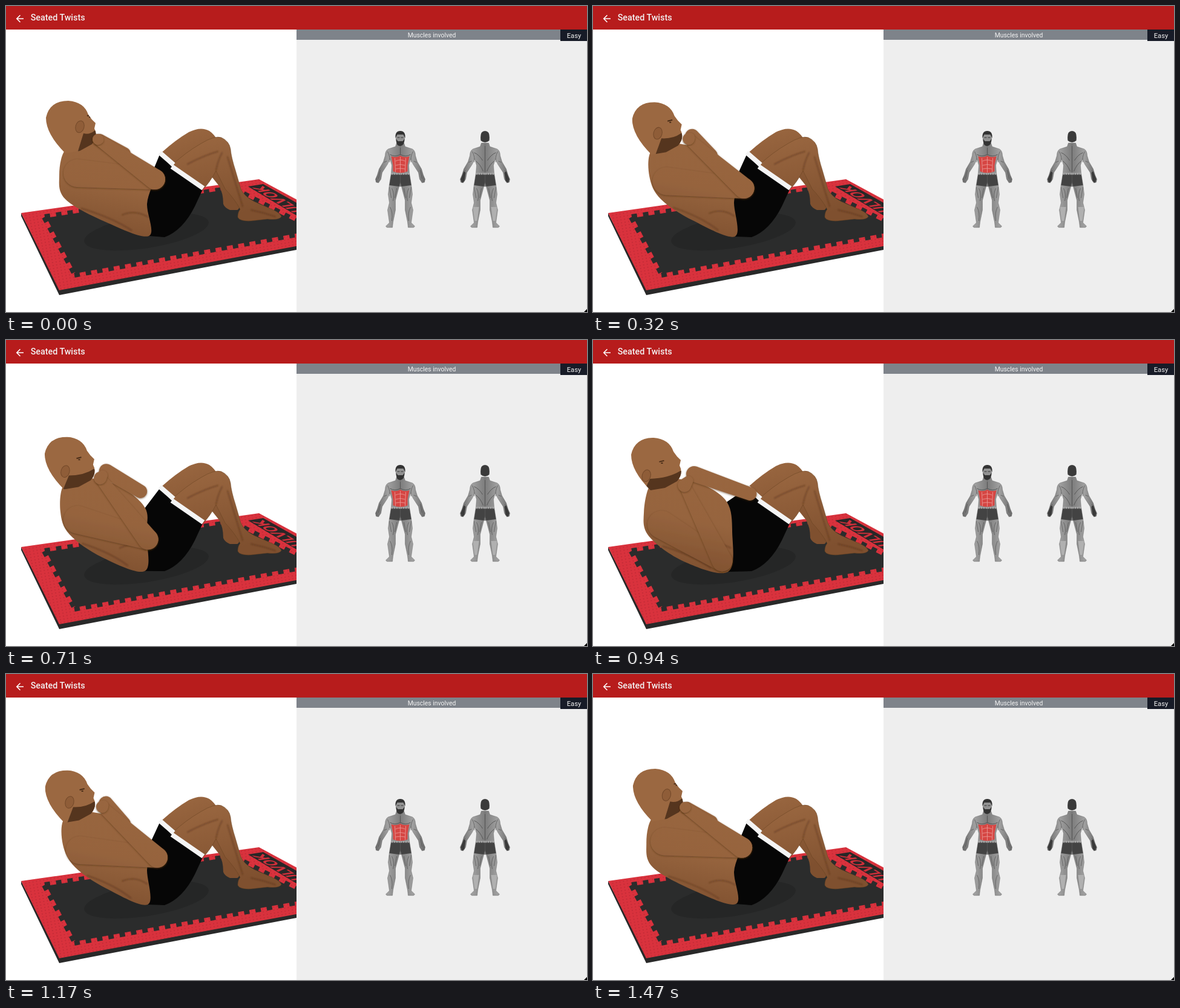
An HTML page that plays this animation: 960 px wide and 507 px high, repeating every 1.56 s.

```html
<!DOCTYPE html>
<html lang="en">
<head>
<meta charset="utf-8">
<title>Seated Twists</title>
<style>
  html, body { margin: 0; width: 100%; height: 100%; overflow: hidden; background: #fff; }
  svg { display: block; }
  text { font-family: Roboto, sans-serif; fill: #f3f3f3; }
  .crease { fill: none; stroke: #4d2b14; stroke-opacity: .4; stroke-width: 2; stroke-linecap: round; filter: url(#soft); }
  .limb { filter: url(#shade); }
</style>
</head>
<body>
<svg width="960" height="507" viewBox="0 0 960 507">
  <defs>
    <linearGradient id="skin" gradientUnits="userSpaceOnUse" x1="150" y1="190" x2="110" y2="390">
      <stop stop-color="#99663f"/><stop offset=".5" stop-color="#96643e"/><stop offset="1" stop-color="#7b4d2d"/>
    </linearGradient>
    <linearGradient id="legSkin" x1="0" y1="0" x2=".3" y2="1">
      <stop stop-color="#9b6841"/><stop offset="1" stop-color="#7f502f"/>
    </linearGradient>
    <linearGradient id="hair" x1="1" y1="0" x2="0" y2="1">
      <stop stop-color="#4b2f1a"/><stop offset=".5" stop-color="#5c3a21"/><stop offset="1" stop-color="#7d512f"/>
    </linearGradient>
    <linearGradient id="grey">
      <stop stop-color="#686868"/><stop offset=".5" stop-color="#a0a0a0"/><stop offset="1" stop-color="#7c7c7c"/>
    </linearGradient>
    <pattern id="foam" width="6" height="5" patternUnits="userSpaceOnUse" patternTransform="rotate(-10)">
      <path fill="#d9323d" d="M0 0h6v5H0z"/><circle cx="2" cy="2" r="1" fill="#c02a35"/>
    </pattern>
    <filter id="soft" x="-30%" y="-30%" width="160%" height="160%"><feGaussianBlur stdDeviation="1"/></filter>
    <filter id="shade"><feDropShadow dx="0" dy="1" stdDeviation="1.5" flood-color="#4d2b14" flood-opacity=".6"/></filter>
    <clipPath id="skull"><path d="M98 244Q66 212 66 185 72 157 103 157 129 159 136 180 141 188 148 194L146 203Q153 216 142 229L122 240Z"/></clipPath>
    <g id="half">
      <path fill="url(#grey)" stroke="#555" stroke-opacity=".5" stroke-width=".8" d="M0 227H-6L-8 233-20 237Q-25 240-25 248L-28 258-35 270-38 280-41 287-40 292-36 293-32 287-30 276-21 262-17 253-14 264-15 277-18 295-20 312-18 326-21 338-18 359-24 365-22 367-13 367-12 358-8 338-8 322-2 299H0Z"/>
      <path fill="none" stroke="#484848" stroke-opacity=".6" d="M-21 241Q-16 251-18 259M-14 302Q-9 312-12 323M-17 333Q-12 342-14 356M-27 259-22 257M-33 272-36 286M-6 302-9 318M-18 300-15 318"/>
      <path fill="#434343" d="M0 278H-15L-18 297-2 299 0 292Z"/>
      <path stroke="#aaa" stroke-width="3" stroke-dasharray="3 1" d="M-15 278H0"/>
    </g>
    <g id="man"><use href="#half"/><use href="#half" transform="scale(-1 1)"/></g>
  </defs>

  <!-- mat -->
  <path fill="#292929" d="M25 343V348L88 479 480 404V396L90 470Z"/>
  <path fill="url(#foam)" d="M25 343 418 287 490 326V396L88 471Z"/>
  <path fill="#2b2c2c" d="M67 351 372 303 480 358V377L115 443Z"/>
  <path fill="none" stroke="#2b2c2c" stroke-width="8" stroke-dasharray="9 10" d="M63 350 113 444M113 446 480 379M64 349 370 302M376 302 482 357"/>
  <path fill="#272727" d="M400 299 425 295 480 326V347Z"/>
  <text transform="matrix(-.86 -.53 .97 -.14 424 298)" text-anchor="end" font-size="26" font-weight="700" style="fill:#cf2f3a">DULVOK</text>
  <ellipse cx="232" cy="374" rx="104" ry="27" transform="rotate(-9 232 374)" fill="#252626"/>

  <!-- legs and shorts -->
  <path fill="url(#legSkin)" d="M258 242Q280 222 302 209 322 199 336 207 345 213 350 224L372 270 386 322Q388 335 382 338L370 338Q361 334 359 328 359 310 352 298L340 283 280 266Z"/>
  <path fill="url(#legSkin)" stroke="#65401f" stroke-opacity=".5" d="M274 264Q296 243 322 228 345 214 356 218 369 224 371 237 372 250 379 272L388 303Q393 315 410 324L442 338Q454 344 455 349 451 355 432 353L405 356Q386 357 383 350 383 341 387 337 378 320 362 303L347 273Q336 294 325 304Z"/>
  <path class="crease" d="M347 272Q350 256 357 243M300 262Q326 248 350 241M366 250Q378 290 391 332M405 338Q425 342 445 349"/>
  <path id="shorts" fill="#060606"/>
  <path stroke="#f4f4f4" stroke-width="8" d="M254 243 277 263M274 266 326 302"/>

  <!-- upper body -->
  <path id="torso" fill="url(#skin)"/>
  <path id="back" class="crease"/>
  <path id="side" class="crease"/>
  <path id="farArm" class="limb" fill="url(#skin)"/>
  <g id="head"><g clip-path="url(#skull)">
    <path fill="#9b6841" d="M60 150H160V250H60Z"/>
    <path id="hair" fill="url(#hair)"/>
    <path id="beard" fill="#55351e"/>
    <ellipse id="ear" rx="7" ry="10" fill="#8f5d38" stroke="#5c371d" stroke-opacity=".6"/>
    <path id="eye" fill="none" stroke="#4a2d18" stroke-width="2"/>
  </g></g>
  <path id="upperArm" class="limb" fill="url(#skin)"/>
  <path id="forearm" class="limb" fill="url(#skin)"/>
  <path id="palm" class="limb" fill="url(#skin)"/>

  <!-- app bar -->
  <path fill="#b71c1c" d="M0 0H960V39H0Z"/>
  <path fill="none" stroke="#fff" stroke-width="1.6" d="M29 21H18M23.5 15.3 17.8 21 23.5 26.7"/>
  <text x="40.700" y="23.800" font-size="14.3" font-weight="500">Seated Twists</text>

  <!-- muscle panel -->
  <path fill="#eee" d="M480 39H960V507H480Z"/>
  <path fill="#7e838a" d="M480 39H916V56H480Z"/>
  <path fill="#171b27" d="M916 39H960V58H916Z"/>
  <text x="703.500" y="51.500" font-size="10.4" text-anchor="middle">Muscles involved</text>
  <text x="938.500" y="53" font-size="11.2" text-anchor="middle">Easy</text>
  <path d="M960 502V507H955Z"/>
  <g transform="translate(651.5)">
    <use href="#man"/>
    <ellipse cy="219" rx="7.500" ry="11.500" fill="#929292"/>
    <path fill="#333" d="M-8 219Q-9 207 0 207T8 219L5 213H-5ZM-7 220-4 224H4L7 220Q7 231 0 232T-7 220Z"/>
    <path stroke="#333" d="M-5 218H-1M1 218H5"/>
    <path fill="none" stroke="#555" d="M-17 246Q-9 251 0 246 9 251 17 246M0 235V246"/>
    <path fill="#d64643" d="M-15 249Q-7 252 0 248 7 252 15 249L12 264 12 274Q0 279-12 274L-12 264Z"/>
    <path fill="none" stroke="#eda19d" stroke-width=".8" d="M0 250V276M-8 257Q0 253 8 257M-8 264Q0 261 8 264M-8 270Q0 268 8 270M-9 252-8 275M9 252 8 275"/>
  </g>
  <g transform="translate(791.5)">
    <use href="#man"/>
    <path fill="#3a3a3a" d="M-7 223Q-9 207 0 207T7 223Q0 229-7 223ZM-35 274-32 276-34 290-38 293-40 287ZM35 274 32 276 34 290 38 293 40 287Z"/>
    <path fill="none" stroke="#4c4c4c" stroke-opacity=".8" d="M0 232V275M-18 243Q-10 246-4 256M18 243Q10 246 4 256M-15 257Q-8 262-3 274M15 257Q8 262 3 274"/>
    <path fill="#b0b0b0" d="M-20 333H-10L-13 356H-17ZM20 333H10L13 356H17Z"/>
  </g>
</svg>
<script>
// Key points when turned away, in profile and turned towards the viewer.
const joints = {
  nape: [[98, 238], [96, 240], [96, 238]],
  blade: [[88, 280], [94, 283], [84, 285]],
  ribs: [[98, 320], [114, 320], [92, 325]],
  loin: [[165, 358], [165, 355], [150, 367]],
  seat: [[236, 381], [234, 382], [223, 384]],
  waist: [[233, 328], [233, 325], [230, 318]],
  belly: [[240, 280], [236, 285], [221, 268]],
  chest: [[188, 243], [190, 243], [178, 238]],
  throat: [[132, 222], [132, 228], [130, 230]],
  shoulder: [[118, 277], [122, 292], [113, 306]],
  elbow: [[246, 287], [250, 304], [213, 367]],
  hand: [[152, 221], [159, 220], [151, 241]],
  farElbow: [[195, 245], [195, 248], [260, 255]],
  farHand: [[155, 222], [165, 214], [167, 222]],
};
// Time in ms and amount of turn.
const turns = [[0, 0], [320, .45], [550, .5], [710, .72], [940, 1], [1170, .5], [1470, .02], [1560, 0]];
const LOOP = 1560, STEP = LOOP / 20;

const el = id => document.getElementById(id);
const set = (id, d) => el(id).setAttribute('d', d);
const lerp = (a, b, f) => a + (b - a) * f;
const mix = (p, q, f) => [lerp(p[0], q[0], f), lerp(p[1], q[1], f)];

function turnAt(t) {
  const i = turns.findIndex(k => k[0] > t), [t0, u0] = turns[i - 1], [t1, u1] = turns[i];
  return lerp(u0, u1, (t - t0) / (t1 - t0));
}

function poseAt(u) {
  const pose = {};
  for (const name in joints) {
    const [away, side, front] = joints[name];
    pose[name] = u < .5 ? mix(away, side, u * 2) : mix(side, front, u * 2 - 1);
  }
  return pose;
}

// Two circles joined by their outer tangents.
function capsule(a, ra, b, rb) {
  const dx = b[0] - a[0], dy = b[1] - a[1];
  const dir = Math.atan2(dy, dx), g = Math.acos((ra - rb) / Math.hypot(dx, dy));
  const rim = (c, r, s) => [c[0] + r * Math.cos(dir + s * g), c[1] + r * Math.sin(dir + s * g)];
  return `M${rim(a, ra, 1)}A${ra} ${ra} 0 ${+(ra > rb)} 1 ${rim(a, ra, -1)}
    L${rim(b, rb, -1)}A${rb} ${rb} 0 ${+(rb > ra)} 1 ${rim(b, rb, 1)}Z`;
}

// Closed smooth curve through the points.
function blob(points) {
  const n = points.length, at = i => points[(i + n) % n];
  return `M${at(0)}` + points.map((p, i) => {
    const a = at(i - 1), c = at(i + 1), e = at(i + 2);
    return `C${p.map((v, k) => v + (c[k] - a[k]) / 6)} ${c.map((v, k) => v - (e[k] - p[k]) / 6)} ${c}`;
  }).join('') + 'Z';
}

function drawHead(u) {
  const d = -31 * u;
  el('head').setAttribute('transform', `translate(${-3 * u} ${5 * u})`);
  set('hair', `M122 150V160L${116 + d / 2} 172 ${121 + d} 187 ${113 + d} 196 ${111 + d} 215 ${115 + d} 250H50V150Z`);
  set('beard', `M${128 + d} ${211 + 14 * u}Q${138 + d / 3} ${214 + 10 * u} 147 ${206 + 6 * u}L156 212 150 250H${116 + d}Z`);
  set('eye', `M${134 + d * .7} ${182 + 15 * u}l8-2m-5 4h3`);
  el('ear').setAttribute('transform', `translate(${122 + d} ${200 + 20 * u}) rotate(15)`);
}

function draw(now) {
  const t = Math.floor((now % LOOP + 12) / STEP) * STEP % LOOP;
  const u = turnAt(t), p = poseAt(u);
  set('shorts', `M254 246L${p.belly}L${p.waist}L${p.seat}L262 383Q292 372 312 332L325 304 274 266Z`);
  set('torso', blob([p.nape, p.blade, p.ribs, p.loin, p.seat, p.waist, p.belly, p.chest, p.throat]));
  set('back', `M${mix(p.ribs, p.loin, .4)}Q${mix(p.loin, p.waist, .2)} ${mix(p.loin, p.seat, .6)}`);
  set('side', `M${mix(p.loin, p.waist, .4)}Q${mix(p.loin, p.waist, .7)} ${mix(p.seat, p.waist, .6)}`);
  set('farArm', capsule(p.farElbow, 11, p.farHand, 10 + 3 * u));
  drawHead(u);
  set('upperArm', capsule(p.shoulder, 23, p.elbow, 17));
  set('forearm', capsule(p.elbow, 17, p.hand, 9));
  set('palm', capsule(p.hand, 9 + 2 * u, mix(p.hand, p.farHand, .4), 8));
  requestAnimationFrame(draw);
}
draw(0);
</script>
</body>
</html>
```
